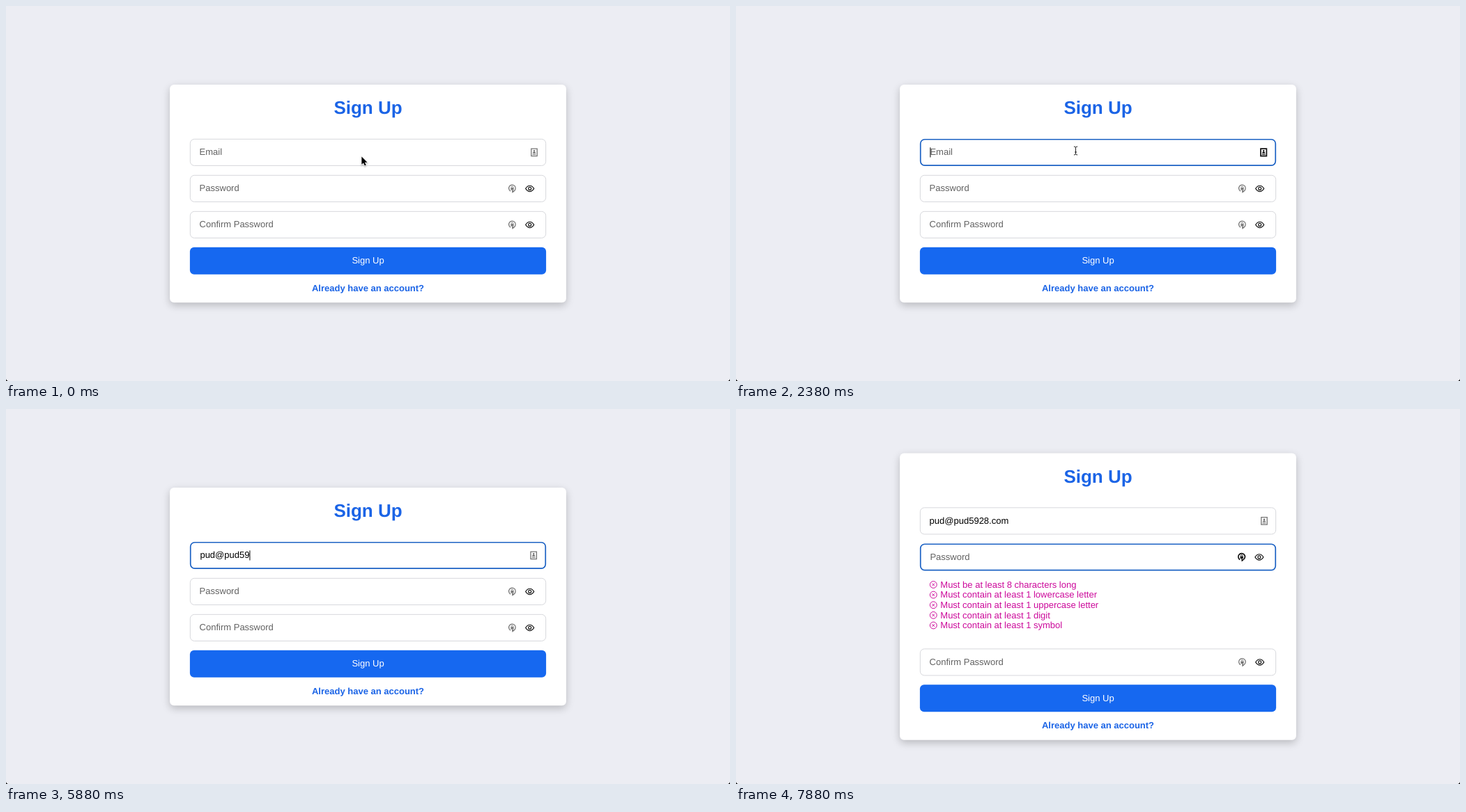
An HTML page with a canvas for the animation above (8000 ms loop, 1039x539 px).

```html
<!DOCTYPE html>
<html lang="en">
<head>
<meta charset="utf-8">
<title>Sign Up</title>
<style>
html, body { margin: 0; width: 100%; height: 100%; overflow: hidden; background: #ecedf3; }
canvas { display: block; }
</style>
</head>
<body>
<canvas id="stage" width="1039" height="539"></canvas>
<script>
const ctx = document.getElementById('stage').getContext('2d');

const LOOP = 8000;
const MOVE_START = 1000, MOVE_STEP = 125, MOVE_STEPS = 5;
const FOCUS_EMAIL = 2000, FOCUS_PASSWORD = 7380;
const EMAIL = 'pud@pud5928.com';
const KEY_TIMES = [2880, 3130, 3380, 4750];
while (KEY_TIMES.length < EMAIL.length) KEY_TIMES.push(5000 + (KEY_TIMES.length - 4) * 200);

const BLUE = '#1668f0', TITLE_BLUE = '#1b64e6', FOCUS_BLUE = '#1c62c4';
const PINK = '#cc0a9b', GREY = '#757575', BLACK = '#111';
const LEFT = 263.9, WIDTH = 511.2, FIELD_H = 39, CENTER = 519.5;
const LINE = 14.625, RULES_H = 99;
const RULES = [
  'Must be at least 8 characters long',
  'Must contain at least 1 lowercase letter',
  'Must contain at least 1 uppercase letter',
  'Must contain at least 1 digit',
  'Must contain at least 1 symbol'
];

function text(str, x, y, color, size = 13, weight = 400, align = 'left') {
  ctx.font = `${weight} ${size}px "Liberation Sans", Helvetica, Arial, sans-serif`;
  ctx.fontKerning = 'none';
  ctx.textRendering = 'geometricPrecision';
  ctx.textAlign = align;
  ctx.fillStyle = color;
  ctx.fillText(str, x, y);
  return ctx.measureText(str).width;
}

function box(x, y, w, h, r) {
  ctx.beginPath();
  ctx.roundRect(x, y, w, h, r);
}

function at(x, y, draw) {
  ctx.save();
  ctx.translate(x, y);
  draw();
  ctx.restore();
}

function strokePath(d, color, width) {
  ctx.strokeStyle = color;
  ctx.lineWidth = width;
  ctx.stroke(new Path2D(d));
}

function fillPath(d, color) {
  ctx.fillStyle = color;
  ctx.fill(new Path2D(d));
}

function contactIcon(x, y, dark) {
  const color = dark ? BLACK : GREY;
  at(x, y, () => {
    strokePath('M-4.2 -5.3H4.2V5.3H-4.2Z', color, dark ? 1.7 : 1.3);
    fillPath('M-1.3 -2A1.3 1.3 0 1 1 1.3 -2A1.3 1.3 0 1 1 -1.3 -2Z', color);
    fillPath('M-2.3 1.5Q-2 -.7 0 -.7T2.3 1.5Z', color);
    strokePath('M-2.4 3.1H2.4', color, 1);
  });
}

function lockIcon(x, y, dark) {
  const color = dark ? BLACK : GREY;
  at(x, y, () => {
    strokePath('M-2.4 4.2A4.8 4.8 0 1 1 2.6 4', color, dark ? 1.7 : 1.3);
    fillPath('M-.6 2.6L3.4 4.1L.1 7.2Z', color);
    fillPath('M-2.1 -.7H2.1V2.6H-2.1Z', color);
    strokePath('M-1.3 -.6V-1.5A1.3 1.3 0 0 1 1.3 -1.5V-.6', color, 0.9);
  });
}

function eyeIcon(x, y) {
  at(x, y, () => {
    strokePath('M-6 0Q-3.4 -4.2 0 -4.2T6 0Q3.4 4.2 0 4.2T-6 0Z', BLACK, 1.1);
    strokePath('M-2 0A2 2 0 1 1 2 0A2 2 0 1 1 -2 0Z', BLACK, 1.1);
  });
}

function crossIcon(x, y) {
  at(x, y, () => {
    strokePath('M-4.9 0A4.9 4.9 0 1 1 4.9 0A4.9 4.9 0 1 1 -4.9 0Z', PINK, 1);
    strokePath('M-1.8 -1.8L1.8 1.8M1.8 -1.8L-1.8 1.8', PINK, 1);
  });
}

function field(y, { label, value = '', focused = false, caret = false, dark = false, secret = false }) {
  const border = focused ? 1.7 : 0.9;
  const shift = focused ? 0.8 : 0;
  const x = 277.6 + shift;
  box(LEFT + border / 2, y + border / 2, WIDTH - border, FIELD_H - border, 6);
  ctx.strokeStyle = focused ? FOCUS_BLUE : '#d3d4d8';
  ctx.lineWidth = border;
  ctx.stroke();

  const w = text(value || label, x, y + 23.4, value ? '#000' : '#626262');
  if (caret) {
    ctx.fillStyle = '#000';
    ctx.fillRect(x + (value ? w : 0), y + 12.4, 1, 14.2);
  }

  const mid = y + 19.5;
  if (secret) {
    lockIcon(726.5 - shift, mid - 0.5, dark);
    eyeIcon(751.7 - shift, mid);
  } else {
    contactIcon(758 - shift, mid, dark);
  }
}

function card(h) {
  ctx.save();
  ctx.shadowColor = 'rgba(0, 0, 0, .22)';
  ctx.shadowBlur = 12;
  ctx.shadowOffsetY = 4;
  box(235.1, 112.9, 568.8, h, 6);
  ctx.fillStyle = '#fff';
  ctx.fill();
  ctx.restore();
}

function pointer(t) {
  if (t < MOVE_START) {
    at(510.4, 216.6, () => {
      const d = 'M0 0V11.2L2.6 8.8L4.4 13L6.3 12.2L4.5 8.1H8.1Z';
      ctx.save();
      ctx.shadowColor = 'rgba(0, 0, 0, .35)';
      ctx.shadowBlur = 2;
      ctx.shadowOffsetY = 1;
      strokePath(d, '#fff', 1.4);
      ctx.restore();
      fillPath(d, '#000');
    });
    return;
  }
  const step = Math.floor((t - MOVE_START) / MOVE_STEP) + 1;
  const left = (1 - Math.min(1, step / MOVE_STEPS)) ** 2;
  at(487.5 + 23 * left, 208 + 9 * left, () => {
    strokePath('M-2.6 -6Q0 -6 0 -4.6Q0 -6 2.6 -6M0 -5V5M-2.6 6Q0 6 0 4.6Q0 6 2.6 6M-1.5 2H1.5', '#222', 1);
  });
}

function windowCorners() {
  fillPath('M0 536Q.4 538.6 3 539H0Z', '#000');
  fillPath('M1039 536Q1038.6 538.6 1036 539H1039Z', '#000');
}

function draw(t) {
  const onPassword = t >= FOCUS_PASSWORD;
  const onEmail = t >= FOCUS_EMAIL && !onPassword;
  const typed = KEY_TIMES.filter(k => k <= t).length;
  const lastEvent = onPassword ? FOCUS_PASSWORD : typed ? KEY_TIMES[typed - 1] : FOCUS_EMAIL;
  const caretOn = Math.floor((t - lastEvent) / 500) % 2 === 0;
  const extra = onPassword ? RULES_H : 0;

  ctx.fillStyle = '#ecedf3';
  ctx.fillRect(0, 0, 1039, 539);

  at(0, -extra / 2, () => {
    card(313.4 + extra);
    text('Sign Up', CENTER, 155, TITLE_BLUE, 26, 700, 'center');
    field(190.9, {
      label: 'Email', value: EMAIL.slice(0, typed), focused: onEmail,
      caret: onEmail && caretOn, dark: t >= MOVE_START && !typed
    });
    field(242.9, {
      label: 'Password', secret: true, focused: onPassword,
      caret: onPassword && caretOn, dark: onPassword
    });
    if (onPassword) {
      RULES.forEach((rule, i) => {
        crossIcon(283.3, 302 + i * LINE);
        text(rule, 293.3, 306.2 + i * LINE, PINK);
      });
    }
    at(0, extra, () => {
      field(294.9, { label: 'Confirm Password', secret: true });
      box(LEFT, 346.7, WIDTH, FIELD_H, 6);
      ctx.fillStyle = BLUE;
      ctx.fill();
      text('Sign Up', CENTER, 370.2, '#fff', 13, 400, 'center');
      text('Already have an account?', CENTER, 409.8, TITLE_BLUE, 13, 700, 'center');
    });
  });

  if (!typed) pointer(t);
  windowCorners();
}

function tick() {
  draw(performance.now() % LOOP);
  requestAnimationFrame(tick);
}
tick();
</script>
</body>
</html>
```
